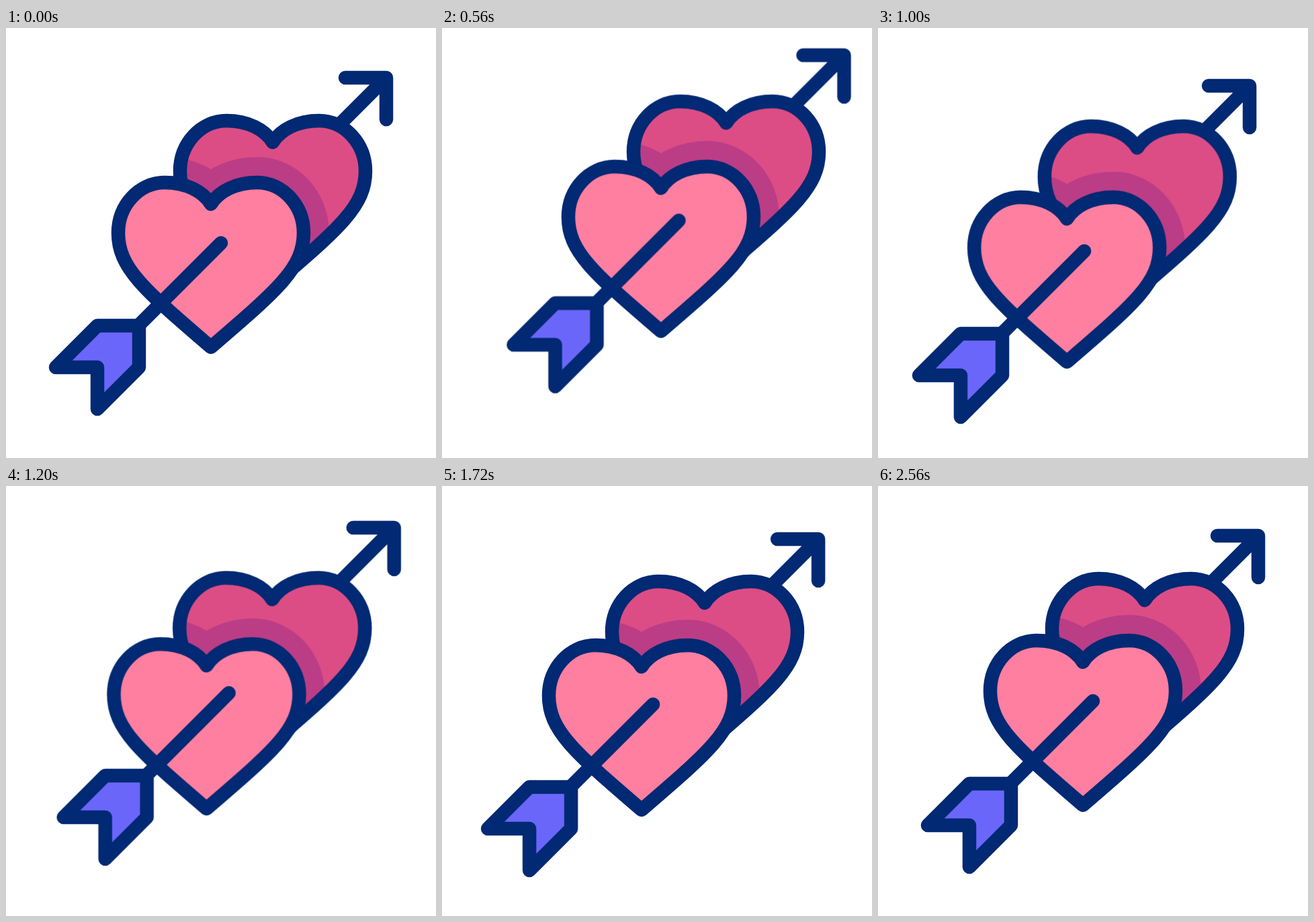
Write an HTML page without scripts that moves like this. It is 640 px wide and 640 px high and loops after 2.92 s.

```html
<!DOCTYPE html>
<html lang="en">
<head>
<meta charset="utf-8">
<title>Two hearts and an arrow</title>
<style>
  html, body { margin: 0; width: 100%; height: 100%; overflow: hidden; background: #fff; }
  svg { display: block; width: 100%; height: 100%; }

  .line { fill: none; stroke: #022973; stroke-width: 20.5; stroke-linecap: round; stroke-linejoin: round; }
  .shadow { fill: none; stroke: #bb3d86; stroke-width: 76; stroke-linejoin: round; }

  .arrow, .front, .back {
    animation: 2920ms cubic-bezier(.333, 0, .667, 1) infinite;
  }
  .arrow { animation-name: arrow; }
  .front { animation-name: front; }
  .back  { animation-name: back; }

  @keyframes arrow {
    0%, 68.49%, 100% { transform: translate(0, 0); }
    10.55% { transform: translate(-26px, 24.5px); }
    21.88% { transform: translate(42px, -43px); }
    34.42% { transform: translate(-13px, 12px); }
    44.9%  { transform: translate(22px, -22px); }
    56.68% { transform: translate(-6.5px, 5.5px); }
  }
  @keyframes front {
    0%, 87.67%, 100% { transform: translate(0, 0); }
    11.82% { transform: translate(-53px, 49.5px); }
    23.97% { transform: translate(59px, -61.5px); }
    35.62% { transform: translate(-27px, 25px); }
    47.6%  { transform: translate(19.5px, -20px); }
    58.9%  { transform: translate(-8px, 7px); }
    70.21% { transform: translate(5px, -5.5px); }
  }
  /* The rear heart rests at (92, -92) from the front one. */
  @keyframes back {
    0%, 87.67%, 100% { transform: translate(92px, -92px); }
    11.82% { transform: translate(48px, -50.5px); }
    23.97% { transform: translate(154px, -157px); }
    35.62% { transform: translate(78px, -81px); }
    47.6%  { transform: translate(108px, -109px); }
    58.9%  { transform: translate(86px, -88px); }
    70.21% { transform: translate(94px, -95px); }
  }
</style>
</head>
<body>
<svg viewBox="0 0 640 640">
  <defs>
    <path id="heart" d="M305 262C293 243 268 230 236 230C198 230 167 264 167 305C167 357 205 389 305 475C405 389 443 357 443 305C443 264 412 230 374 230C342 230 317 243 305 262Z"/>
    <clipPath id="rear"><use href="#heart" class="back"/></clipPath>
  </defs>

  <path class="line arrow" d="M505 74H566V136M566 74L440 200"/>

  <use href="#heart" class="back" fill="#dc4d85"/>
  <g clip-path="url(#rear)">
    <g class="front"><use href="#heart" class="shadow"/></g>
  </g>
  <use href="#heart" class="line back"/>

  <g class="front">
    <use href="#heart" fill="#ff7fa0"/>
    <use href="#heart" class="line"/>
  </g>

  <g class="arrow">
    <path class="line" d="M198 442L320 320"/>
    <path class="line" style="fill:#6b66fa" d="M74 505L136 443H198V505L136 567V505Z"/>
  </g>
</svg>
</body>
</html>
```
